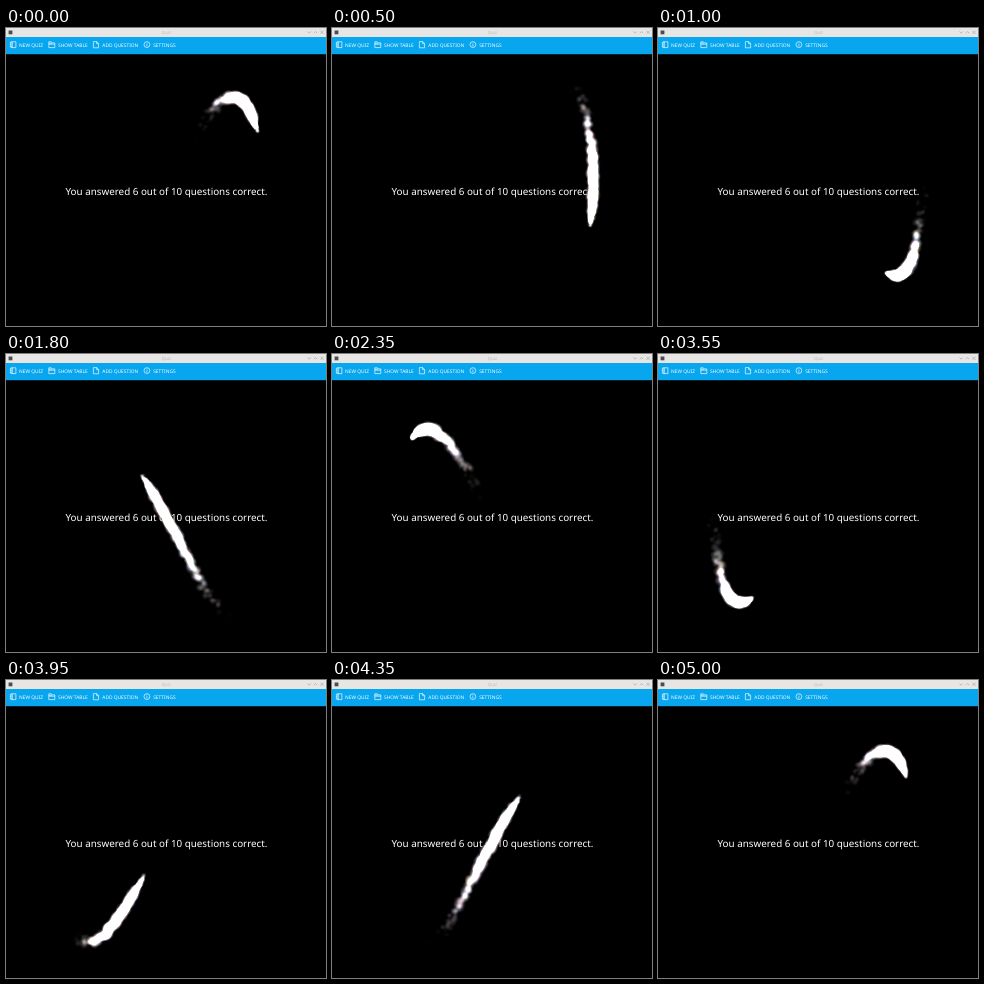
An HTML page with a canvas for the animation above (5050 ms loop, 320 by 298 pixels).

```html
<!DOCTYPE html>
<html lang="en">
<head>
<meta charset="utf-8">
<title>Quiz</title>
<style>
  html, body { margin: 0; width: 100%; height: 100%; overflow: hidden; background: #000; }
  svg, canvas { position: absolute; left: 0; top: 0; width: 320px; height: 298px; display: block; }
  text { font-family: "Noto Sans", sans-serif; fill: #fff; text-rendering: geometricPrecision; }
  .menu text { font-size: 4.87px; font-weight: 500; }
  .icon { fill: none; stroke: #fff; stroke-width: .65; }
  .window { fill: none; stroke: #aaa8a6; stroke-width: .7; }
</style>
</head>
<body>
<svg viewBox="0 0 320 298">
  <rect width="320" height="298"/>
  <rect width="320" height="9" fill="#e8e6e4"/>
  <rect y="9" width="320" height="17.2" fill="#08a6ef"/>
  <rect x="2.6" y="2.5" width="3.8" height="3.8" fill="#4b4d4c"/>
  <text x="160.5" y="5.8" text-anchor="middle" style="font-size:4.4px;fill:#bcbab8">Quiz</text>
  <path class="window" d="M301.5 3.5l1.7 1.7 1.7-1.7M307.8 5.2l1.7-1.7 1.7 1.7M314.4 2.7l3.2 3.2m0-3.2l-3.2 3.2"/>
  <g class="menu">
    <path class="icon" d="M4.9 13.8h5v5.8h-5zM6.3 13.8v5.8M3.8 15h1.6M3.8 16.7h1.6M3.8 18.4h1.6"/>
    <text x="13" y="18.6">NEW QUIZ</text>
    <path class="icon" d="M42.8 19.6v-5.8h2.5l.8 1.1h2.7v4.7zM42.8 16.2h6M42.8 15.2h3.2"/>
    <text x="52" y="18.6">SHOW TABLE</text>
    <path class="icon" d="M87.4 13.6h3.4l1.8 1.9v4.3h-5.2zM90.6 13.6v2.1h2"/>
    <text x="96.3" y="18.6">ADD QUESTION</text>
    <circle class="icon" cx="140.9" cy="16.6" r="2.9"/>
    <path class="icon" d="M140.9 14.8v.7M140.9 16.1v2.3"/>
    <text x="147.2" y="18.6">SETTINGS</text>
  </g>
  <text x="160.5" y="166.9" text-anchor="middle" font-size="9.83">You answered 6 out of 10 questions correct.</text>
</svg>
<canvas id="trail" width="320" height="298"></canvas>
<script>
const LOOP = 5050, STEP = 50, SPACING = 4, COUNT = Math.floor(LOOP / SPACING);
const TAU = Math.PI * 2, RAD = Math.PI / 180;
const ctx = document.getElementById('trail').getContext('2d');

const random = n => {
  const v = Math.sin(n * 12.9898 + 4.137) * 43758.5453;
  return v - Math.floor(v);
};
const clamp = v => Math.max(0, Math.min(1, v));

// Soft round sprite with a slight tint
function makeSprite(hue) {
  const c = document.createElement('canvas');
  c.width = c.height = 32;
  const g = c.getContext('2d');
  const fill = g.createRadialGradient(16, 16, 0, 16, 16, 16);
  fill.addColorStop(0, `hsla(${hue},50%,92%,1)`);
  fill.addColorStop(.4, `hsla(${hue},45%,88%,.7)`);
  fill.addColorStop(1, `hsla(${hue},45%,80%,0)`);
  g.fillStyle = fill;
  g.fillRect(0, 0, 32, 32);
  return c;
}
const sprites = [20, 50, 200, 240, 300, 340].map(makeSprite);

const particles = Array.from({ length: COUNT }, (_, i) => {
  const angle = random(i + .1) * TAU, speed = Math.sqrt(random(i + .3));
  return {
    born: i * LOOP / COUNT,
    life: 520 + 190 * random(i + .5),
    dx: Math.cos(angle) * speed,
    dy: Math.sin(angle) * speed,
    size: .8 + .4 * random(i + .7),
    sprite: sprites[Math.floor(random(i + .9) * sprites.length)]
  };
});

// Figure eight: one swing across, two swings up and down
function emitter(t) {
  const turn = TAU * t / LOOP;
  const a = turn - 24 * RAD, b = 2 * turn + 44 * RAD;
  return {
    x: 160 + 100 * Math.cos(a), y: 163 - 82 * Math.cos(b),
    vx: 4 * Math.cos(a), vy: -25 * Math.cos(b - 15 * RAD)
  };
}

function draw(t) {
  ctx.clearRect(0, 0, 320, 298);
  ctx.globalCompositeOperation = 'lighter';
  for (const p of particles) {
    const age = (t - p.born + LOOP) % LOOP;
    if (age >= p.life) continue;
    const e = emitter(p.born), k = age / 650, left = 1 - age / p.life;
    const spread = 1 + 5.5 * k * k;
    const x = e.x + e.vx * k + p.dx * spread;
    const y = e.y + e.vy * k + p.dy * spread;
    const r = p.size * (2.2 + 4 * clamp(age / 110)) * (.4 + .6 * clamp(left * 1.8));
    ctx.globalAlpha = .75 * clamp(.35 + age / 60) * Math.pow(clamp(left * 1.7), 1.2);
    ctx.drawImage(p.sprite, x - r, y - r, 2 * r, 2 * r);
  }
}

const start = performance.now();
function tick() {
  const t = (performance.now() - start) % LOOP;
  draw(Math.floor(t / STEP) * STEP);
  requestAnimationFrame(tick);
}
tick();
</script>
</body>
</html>
```
